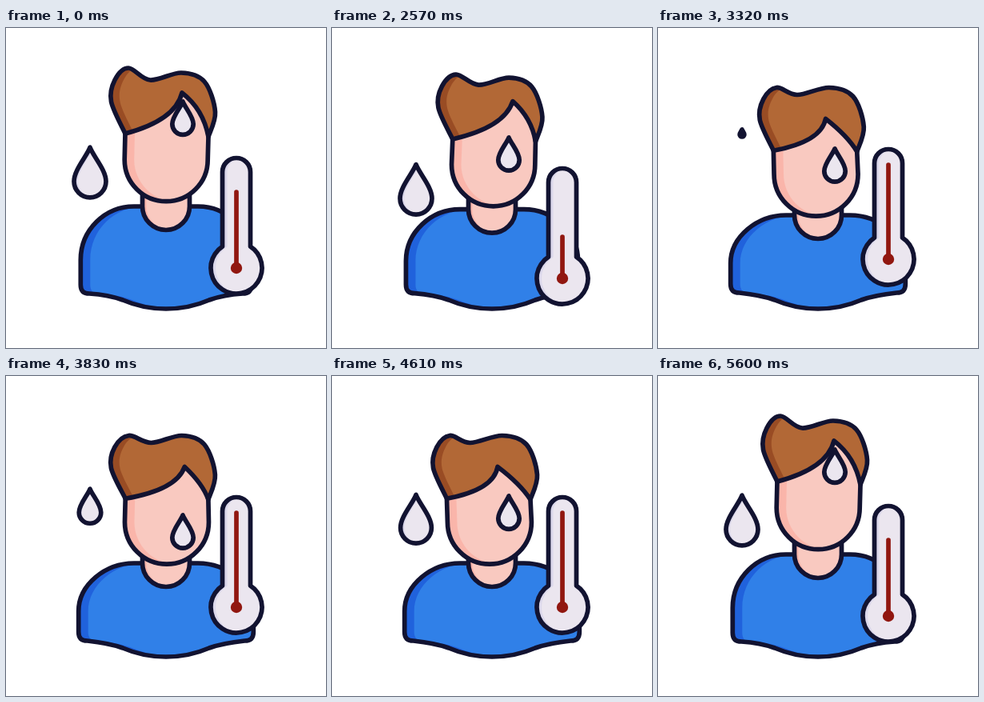
An HTML page with a canvas for the animation above (5660 ms loop, 400x400 px).

```html
<!DOCTYPE html>
<html lang="en">
<head>
<meta charset="utf-8">
<title>Fever</title>
<style>
  html, body { margin: 0; width: 100%; height: 100%; overflow: hidden; background: #fff; }
  canvas { display: block; width: 400px; height: 400px; }
</style>
</head>
<body>
<canvas id="stage" width="400" height="400"></canvas>
<script>
const ctx = document.getElementById('stage').getContext('2d');
const LOOP = 5660, START = 2030, END = 5600, STEP = 30;
const INK = '#121331', MERCURY = '#911710';
const HAIR = ['#b26836', '#994c24'];
const SKIN = ['#f9c9c0', '#fab5aa'];
const SHIRT = ['#3080e8', '#2062dc'];
const PALE = ['#ebe6ef', '#dcd8eb'];

const progress = (t, from, to) => Math.min(1, Math.max(0, (t - from) / (to - from)));
const ease = (t, from, to) => {
  const u = progress(t, from, to);
  return u * u * (3 - 2 * u);
};
const pulse = (t, from, to) => Math.sin(Math.PI * progress(t, from, to)) ** 2;

// The head lifts a little before bowing and again after coming back up.
const bowAt = t => ease(t, 2270, 3050) - ease(t, 4610, 5210)
  - .3 * (pulse(t, START, 2520) + pulse(t, 4960, 5540));

// Slow head shake that strengthens towards the end.
const turnAt = t => {
  const strength = .75 * ease(t, START, 2500) + .25 * ease(t, 3900, 4600) - ease(t, 4650, 5500);
  return -strength * Math.cos(2 * Math.PI * (t - 4600) / 1300);
};

const sweatAt = t => 58 * (ease(t, START, 2810) - ease(t, 4610, END)) + 24 * pulse(t, 3250, 4450);

function sideDropAt(t) {
  if (t < 3150) return { shift: 42 * ease(t, START, 3100), scale: 1 - ease(t, 2570, 3050) };
  const missing = (1 - progress(t, 3230, END)) ** 4;
  return { shift: -57 * missing, scale: 1 - missing };
}

function gaugeAt(t) {
  const dip = ease(t, START, 2570) - ease(t, 2570, 3150);
  const heat = ease(t, 2570, 3150) - ease(t, 4650, END);
  return { shift: 13 * dip - 11 * heat, length: 95 - 43 * dip + 23 * heat };
}

function paint(path, [base, dark], shadeWidth, shadeEnd) {
  ctx.fillStyle = base;
  ctx.fill(path);
  ctx.save();
  ctx.clip(path);
  ctx.beginPath();
  ctx.rect(0, 0, Math.round(shadeEnd), 400);
  ctx.clip();
  ctx.fillStyle = dark;
  ctx.fillRect(0, 0, 400, 400);
  ctx.translate(shadeWidth, 0);
  ctx.fillStyle = base;
  ctx.fill(path);
  ctx.restore();
  ctx.strokeStyle = INK;
  ctx.lineWidth = 5.7;
  ctx.stroke(path);
}

// Adds a Catmull-Rom spline that starts at the first point.
function spline(path, points) {
  const at = i => points[Math.min(points.length - 1, Math.max(0, i))];
  const handle = (i, sign) => at(i).map((v, k) => v + sign * (at(i + 1)[k] - at(i - 1)[k]) / 6);
  path.moveTo(...points[0]);
  for (let i = 1; i < points.length; i++) {
    path.bezierCurveTo(...handle(i - 1, 1), ...handle(i, -1), ...points[i]);
  }
}

// Curves from a to b, pulled away from the chord's middle.
function bend(path, a, b, dx, dy) {
  path.quadraticCurveTo((a[0] + b[0]) / 2 + dx, (a[1] + b[1]) / 2 + dy, ...b);
}

function drawBody(bow) {
  const top = 223 + 11 * bow, side = 106.7 + 2.6 * bow, low = 321 - bow;
  const p = new Path2D();
  const curve = (m, ...xy) => p.bezierCurveTo(...xy.map((v, i) => i % 2 ? v : 200 + m * v));
  p.moveTo(200, 351);
  curve(-1, 20, 351, 38, 347, 54, 340);
  curve(-1, 68, 335, 80, 333, side - 11, low + 11);
  curve(-1, side - 4, low + 11, side, low + 8, side, low);
  p.lineTo(200 - side, 290 + 4 * bow);
  curve(-1, side, 252 + 9 * bow, 76, top, 40, top);
  p.lineTo(240, top);
  curve(1, 76, top, side, 252 + 9 * bow, side, 290 + 4 * bow);
  p.lineTo(200 + side, low);
  curve(1, side, low + 8, side - 4, low + 11, side - 11, low + 11);
  curve(1, 80, 333, 68, 335, 54, 340);
  curve(1, 38, 347, 20, 351, 0, 351);
  p.closePath();
  paint(p, SHIRT, 12, 190);

  const neck = new Path2D();
  neck.moveTo(170.5, top - 25);
  neck.arc(200, top, 29.5, Math.PI, 0, true);
  neck.lineTo(229.5, top - 25);
  paint(neck, SKIN, 5, 185);
}

function drawHead(bow, turn) {
  // The front lock sinks more than the back; the middle turns more than the edges.
  const crown = [
    [149, 132], [131.5, 92], [136, 65], [153, 50], [180, 65],
    [219, 56], [248, 67], [261.5, 105], [253, 136]
  ].map(([x, y]) => [
    x - 2 * bow + turn * (3 + 3 * Math.max(0, 1 - Math.abs(x - 190) / 50)),
    y + bow * (x < 170 ? 26.5 - .04 * y : 18.5)
  ]);
  const left = crown[0], right = crown[crown.length - 1];
  const tip = [220 - 3 * bow + 10 * turn, 81 + 32.5 * bow];

  const cx = 200.2 - .8 * bow + 2.5 * turn, cy = 164.7 + 18 * bow, r = 52 + .5 * bow;
  const face = new Path2D();
  face.moveTo(left[0] + 8, left[1] - 12);
  face.lineTo(...left);
  face.lineTo(cx - r, cy);
  face.arc(cx, cy, r, Math.PI, 0, true);
  face.lineTo(...right);
  face.lineTo(right[0] - 3, tip[1] + 12);
  face.lineTo(tip[0], tip[1] - 8);
  face.closePath();
  paint(face, SKIN, 12, 200);

  const hair = new Path2D();
  spline(hair, crown);
  bend(hair, right, tip, 10 - 2 * bow, -7 + 8 * bow);
  bend(hair, tip, left, 27, 9);
  hair.closePath();
  paint(hair, HAIR, 11, crown[3][0] + 8);
}

function drawDrop(x, y, scale) {
  if (scale < .02) return;
  const p = new Path2D();
  const at = (...xy) => xy.map((v, i) => (i % 2 ? y : x) + v * scale);
  p.moveTo(...at(0, -31));
  p.bezierCurveTo(...at(-4, -20, -20, -3, -20, 11.5));
  p.arc(x, y + 11.5 * scale, 20 * scale, Math.PI, 0, true);
  p.bezierCurveTo(...at(20, -3, 4, -20, 0, -31));
  p.closePath();
  paint(p, PALE, 5 * scale, x);
}

function drawThermometer({ shift, length }) {
  const x = 288, y = 300 + shift, r = 32, half = 17.5;
  const joint = Math.acos(half / r);
  const p = new Path2D();
  p.arc(x, y - 120, half, Math.PI, 0);
  p.arc(x, y, r, -joint, Math.PI + joint);
  p.closePath();
  paint(p, PALE, 6, x);
  ctx.strokeStyle = ctx.fillStyle = MERCURY;
  ctx.beginPath();
  ctx.moveTo(x, y);
  ctx.lineTo(x, y - length);
  ctx.stroke();
  ctx.beginPath();
  ctx.arc(x, y, 7.2, 0, 2 * Math.PI);
  ctx.fill();
}

function draw(t) {
  ctx.fillStyle = '#fff';
  ctx.fillRect(0, 0, 400, 400);
  ctx.lineJoin = ctx.lineCap = 'round';
  const bow = bowAt(t), drop = sideDropAt(t);
  drawBody(bow);
  drawHead(bow, turnAt(t));
  drawDrop(221, 112.5 + sweatAt(t), .66);
  drawDrop(105, 180.3 + drop.shift, drop.scale);
  drawThermometer(gaugeAt(t));
}

const origin = performance.now();
function tick() {
  const t = (performance.now() - origin) % LOOP;
  draw(t < START ? 0 : START + Math.floor((t - START) / STEP) * STEP);
  requestAnimationFrame(tick);
}
tick();
</script>
</body>
</html>
```
